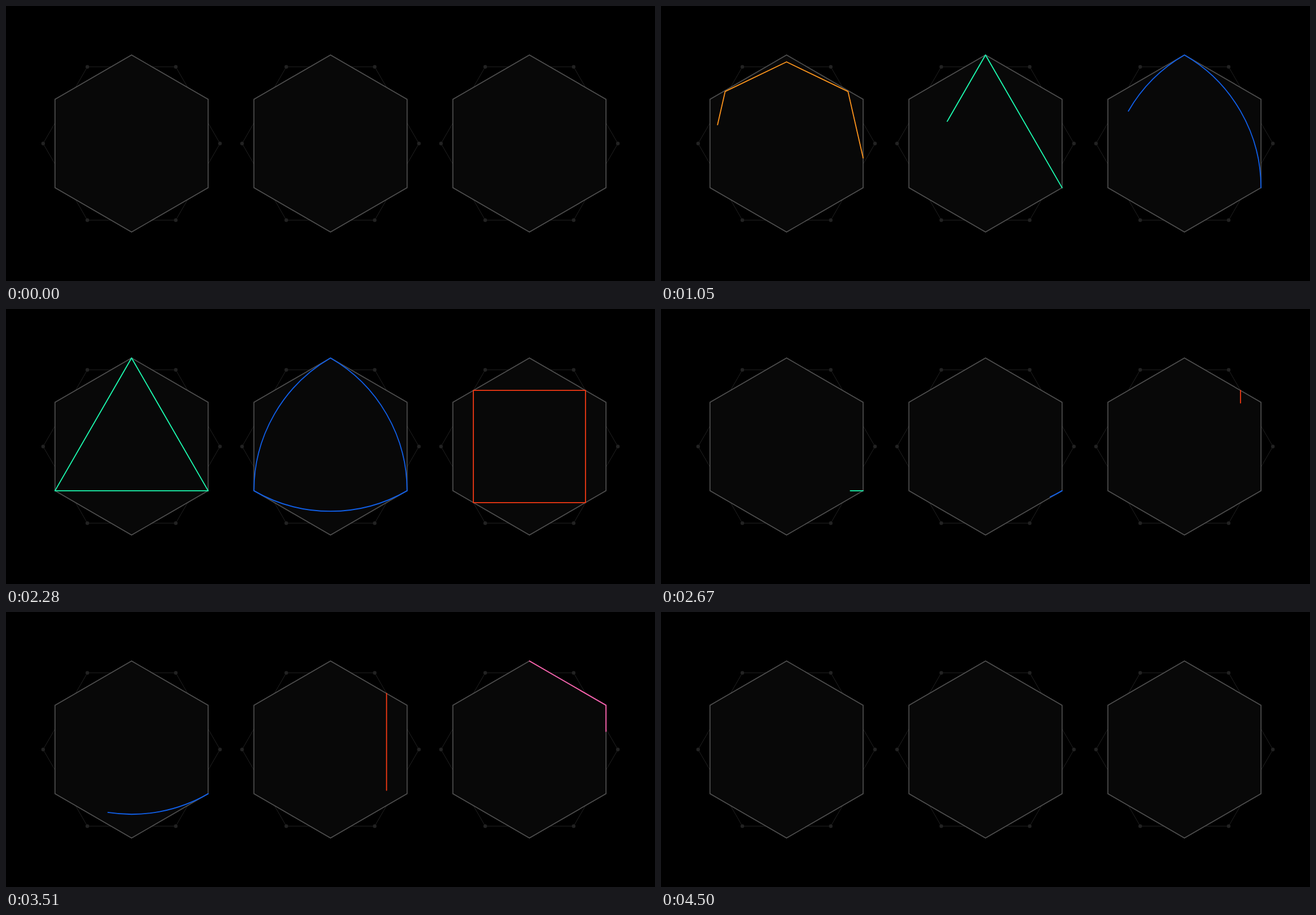
These frames come from a looping animation (1150x487 px, 4.53 s). An HTML page:

```html
<!DOCTYPE html>
<html lang="en">
<head>
<meta charset="utf-8">
<title>Shapes in hexagons</title>
<style>
  html, body { margin: 0; width: 100%; height: 100%; overflow: hidden; background: #000; }
  svg { display: block; width: 100%; height: 100%; }
  .ring { fill: none; stroke: #222; stroke-width: 1; }
  .dot { fill: #222; }
  .face { fill: #080808; stroke: #4f4f4f; stroke-width: 1.7; }
  .trace { fill: none; stroke-width: 1.8; stroke-linecap: round; stroke-linejoin: round; }
</style>
</head>
<body>
<svg id="stage" viewBox="0 0 1150 487"></svg>
<script>
const LOOP = 4530, TICK = 30, CYCLE = 900, PART = 300;
const R = 156.7;
const W = R * Math.sqrt(3);
const HALF = R / (1 + 1 / Math.sqrt(3));
const HEPT = W / 2 / Math.sin(Math.PI * 4 / 7);

// Corners counterclockwise; angles are in turns clockwise from the top.
function corners(n, radius, start, dy = 0) {
  return Array.from({ length: n }, (_, i) => {
    const a = 2 * Math.PI * (start - i / n);
    return [radius * Math.sin(a), dy - radius * Math.cos(a)];
  });
}
const closed = pts => "M" + pts.join("L") + "Z";

function reuleaux() {
  const [a, b, c] = corners(3, R, 1 / 3);
  const arc = p => `A${W},${W} 0 0 0 ${p}`;
  return `M${a}` + arc(b) + arc(c) + arc(a);
}

const shapes = [
  { color: "#ff5fae", d: closed(corners(6, R, 0)) },
  { color: "#ff951c", d: closed(corners(7, HEPT, 2 / 7, HEPT - 144.5)) },
  { color: "#1cfbb0", d: closed(corners(3, R, 1 / 3)) },
  { color: "#1060ea", d: reuleaux() },
  { color: "#f53a14", d: closed(corners(4, HALF * Math.SQRT2, 1 / 8)) }
];

function add(parent, tag, attrs) {
  const el = document.createElementNS("http://www.w3.org/2000/svg", tag);
  for (const key in attrs) el.setAttribute(key, attrs[key]);
  return parent.appendChild(el);
}

const stage = document.getElementById("stage");
const traces = [222.5, 575, 927.5].map(x => {
  const g = add(stage, "g", { transform: `translate(${x} 243.5)` });
  const outer = corners(6, R, 1 / 4);
  add(g, "path", { class: "ring", d: closed(outer) });
  for (const [cx, cy] of outer) add(g, "circle", { class: "dot", cx, cy, r: 3.2 });
  add(g, "path", { class: "face", d: closed(corners(6, R, 0)) });
  return add(g, "path", { class: "trace", pathLength: 1 });
});

const ease = t => {
  const u = Math.min(1, Math.max(0, t));
  return u * u * (3 - 2 * u);
};

function render(ms) {
  const t = Math.floor((ms % LOOP) / TICK) * TICK;
  const step = Math.floor(t / CYCLE);
  const u = t % CYCLE;
  const head = ease(u / PART);
  const tail = ease((u - 2 * PART) / PART);
  traces.forEach((el, i) => {
    const { color, d } = shapes[(step + i) % shapes.length];
    el.setAttribute("d", d);
    el.setAttribute("stroke", color);
    el.setAttribute("stroke-dasharray", `${head - tail} 2`);
    el.setAttribute("stroke-dashoffset", -tail);
    el.setAttribute("visibility", head > tail ? "visible" : "hidden");
  });
}

const begin = performance.now();
function frame() {
  render(performance.now() - begin);
  requestAnimationFrame(frame);
}
frame();
</script>
</body>
</html>
```
